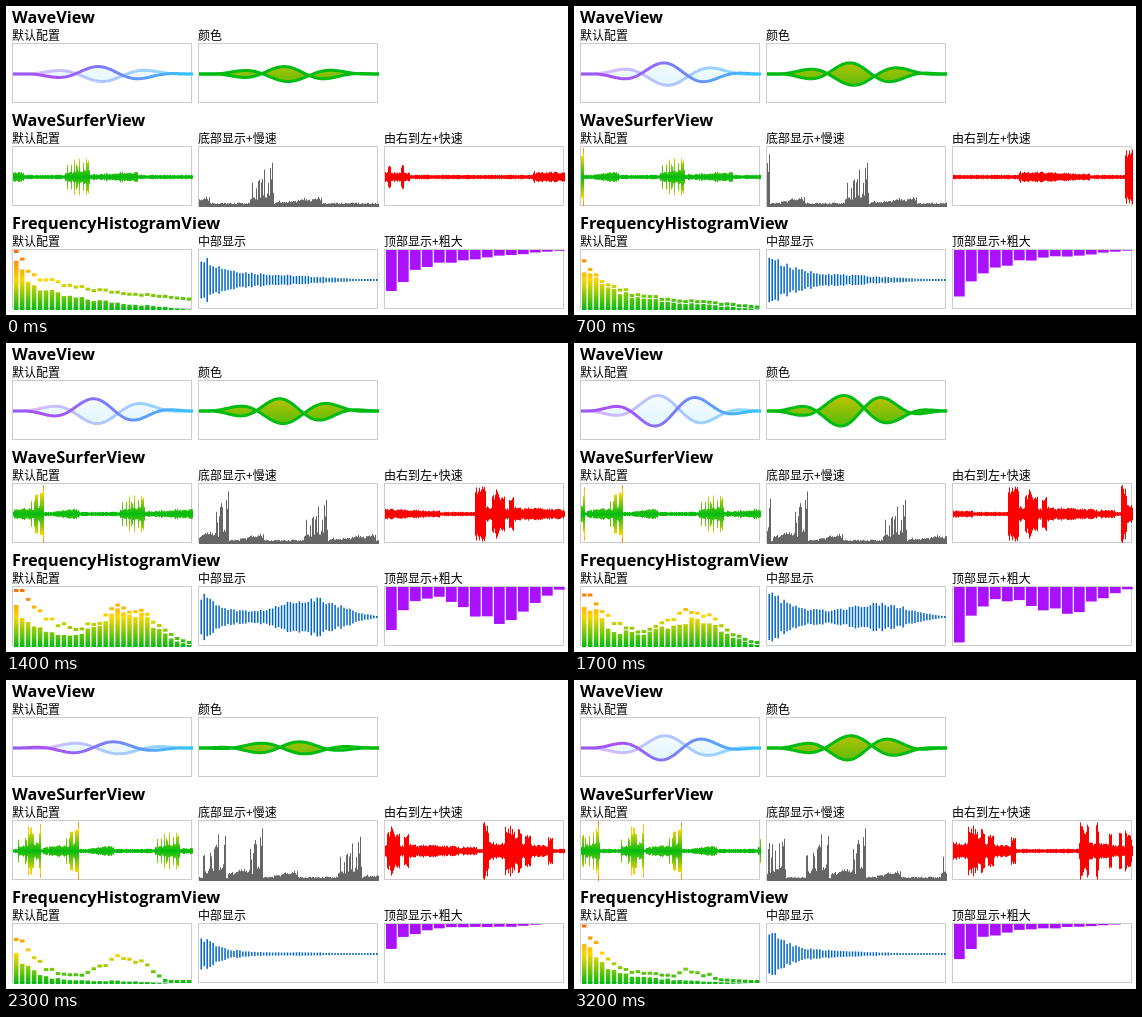
Write an HTML page with a canvas that moves like this. It is 562 by 309 pixels and loops after 3.3 s.

```html
<!DOCTYPE html>
<html lang="zh">
<head>
<meta charset="utf-8">
<style>
  html, body { margin: 0; width: 100%; height: 100%; overflow: hidden; background: #fff; }
  svg, canvas { position: absolute; left: 0; top: 0; width: 562px; height: 309px; }
  rect { fill: none; stroke: #ccc; }
  text { font: 12px "Noto Sans CJK SC", "Noto Sans CJK", "Noto Sans CJK JP", sans-serif; }
  .title { font: bold 16.3px "Open Sans", "Noto Sans", sans-serif; }
</style>
</head>
<body>
<svg viewBox="0 0 562 309">
  <g>
    <text class="title" x="6" y="17">WaveView</text>
    <text x="6" y="34">默认配置</text>
    <text x="192" y="34">颜色</text>
    <rect x="6.5" y="37.5" width="179" height="59"/>
    <rect x="192.5" y="37.5" width="179" height="59"/>
  </g>
  <g transform="translate(0 103)">
    <text class="title" x="6" y="17">WaveSurferView</text>
    <text x="6" y="34">默认配置</text>
    <text x="192" y="34">底部显示+慢速</text>
    <text x="378" y="34">由右到左+快速</text>
    <rect x="6.5" y="37.5" width="179" height="59"/>
    <rect x="192.5" y="37.5" width="179" height="59"/>
    <rect x="378.5" y="37.5" width="179" height="59"/>
  </g>
  <g transform="translate(0 206)">
    <text class="title" x="6" y="17">FrequencyHistogramView</text>
    <text x="6" y="34">默认配置</text>
    <text x="192" y="34">中部显示</text>
    <text x="378" y="34">顶部显示+粗大</text>
    <rect x="6.5" y="37.5" width="179" height="59"/>
    <rect x="192.5" y="37.5" width="179" height="59"/>
    <rect x="378.5" y="37.5" width="179" height="59"/>
  </g>
</svg>
<canvas id="stage" width="562" height="309"></canvas>
<script>
const ctx = document.getElementById('stage').getContext('2d');
const W = 180, H = 60, MID = H / 2;
const STEP = 100, STEPS = 33;

const rand = (a, b = 0) => {
  const v = Math.sin(a * 12.9898 + b * 78.233) * 43758.5453;
  return v - Math.floor(v);
};

// Pulse peaking at 1, with its own rise and fall widths
const bump = (n, at, rise, fall) => Math.exp(-(((n - at) / (n < at ? rise : fall)) ** 2));

function gradient(x1, y1, stops) {
  const g = ctx.createLinearGradient(0, 0, x1, y1);
  stops.forEach(([at, color]) => g.addColorStop(at, color));
  return g;
}

const GREEN = 'rgb(0,187,17)', YELLOW = 'rgb(255,215,0)', ORANGE = 'rgb(255,102,0)';

function panel(col, row, draw) {
  ctx.save();
  ctx.translate(7 + col * 186, 38 + row * 103);
  ctx.beginPath();
  ctx.rect(0, 0, W, H);
  ctx.clip();
  draw();
  ctx.restore();
}

// Overall volume at a step, 0..1
const power = n => .07 + .2 * bump(n, 1, 3, 4) + .56 * bump(n, 8, 1.2, 4)
  + .48 * bump(n, 17.5, 5, 5) + .6 * bump(n, 29, 1.2, 4);

// ---- Sine waves ----
const blueWave = {
  front: gradient(W, 0, [[0, 'rgb(150,96,238)'], [.2, 'rgb(170,79,249)'], [1, 'rgb(53,199,253)']]),
  back: gradient(W, 0, [[0, 'rgba(209,130,255,.6)'], [1, 'rgba(53,199,255,.6)']]),
  fill: gradient(0, H, [[0, 'rgba(255,255,255,.2)'], [1, 'rgba(54,197,252,.2)']])
};
const greenWave = {
  front: GREEN, back: GREEN,
  fill: gradient(0, H, [[0, 'rgb(250,195,0)'], [1, 'rgb(25,187,16)']])
};

function wavePath(freq, amp, phase) {
  const pts = [];
  for (let x = 0; x <= W; x++) {
    const u = x / W, env = Math.sin(Math.PI * u) ** 2;
    pts.push([x, MID + env * MID * amp * Math.sin(2 * Math.PI * u * freq + phase)]);
  }
  return pts;
}

function trace(pts) {
  ctx.beginPath();
  pts.forEach(p => ctx.lineTo(...p));
}

function drawWave(n, colors) {
  const amp = power(n), phase = 5.1 - .872 * n;
  const front = wavePath(2, amp, phase), back = wavePath(1.8, amp, phase + 3.45);
  trace(front.concat([...back].reverse()));
  ctx.fillStyle = colors.fill;
  ctx.fill();
  ctx.lineWidth = 3;
  for (const [pts, color] of [[back, colors.back], [front, colors.front]]) {
    trace(pts);
    ctx.strokeStyle = color;
    ctx.stroke();
  }
}

// ---- Scrolling loudness ----
// Syllables: start step, end step, body level, spike level
const syllables = [
  [-32, -20, .15, .2], [-19.5, -13.2, .25, .8], [-2.7, 3.4, .19, .2], [6.4, 9.7, .28, 1.05],
  [9.7, 15.5, .23, .23], [16, 22, .3, 1], [27.4, 33, .28, 1]
];

function loudness(k, speed) {
  const s = k / speed, grain = .7 + .4 * rand(k, speed);
  const hit = syllables.find(([from, to]) => s >= from && s < to);
  if (!hit) return .07 * grain;
  const [from, to, body, spike] = hit;
  const fade = 1 - .45 * (s - from) / (to - from);
  const cell = Math.floor(s / .28);
  const level = rand(cell, 5) > .6 ? spike * (.7 + .3 * rand(cell, 9)) : body;
  return Math.min(1, level * fade * grain);
}

const mirrored = gradient(0, H,
  [[0, ORANGE], [.15, YELLOW], [.5, GREEN], [.85, YELLOW], [1, ORANGE]]);

function drawSurfer(n, { speed, color, bottom, reverse }) {
  ctx.fillStyle = color;
  const head = Math.round(speed * n);
  for (let j = 0; j < W; j++) {
    const v = loudness(head - j, speed);
    const x = reverse ? W - 1 - j : j;
    const h = bottom ? Math.max(2, v * H * .95) : Math.max(2, v * H);
    ctx.fillRect(x, bottom ? H - h : MID - h / 2, 1, h);
  }
}

// ---- Spectrum: low tones, a sloping voice and a high hiss ----
function barHeight(n, i, count) {
  const b = Math.max(0, (i + .5) / count * 15 - .5);
  const low = 18 + 32 * power(n);
  const voice = 26 * power(n) + 12 * bump(n, 0, 1, 6) + 14 * bump(n, 10, 3, 2);
  const hiss = 34 * bump(n, 13, 1.5, 6);
  const h = low * Math.exp(-b / 1.4) + voice * Math.max(0, 1 - b / 16)
    + hiss * bump(b, 9, 3.3, 3.3) - 1.5;
  return Math.min(H, Math.max(0, h) * (.8 + .35 * rand(i + count, n)));
}

// Caps ride on the bars and sink slowly
function capHeight(n, i) {
  const sink = 1.5;
  let top = barHeight(0, i, 30) + 8 - sink * n;
  for (let k = 0; k <= n; k++) top = Math.max(top, barHeight(n - k, i, 30) - sink * k);
  return Math.min(H, Math.max(3, top + 4));
}

const rising = gradient(0, H, [[0, ORANGE], [.5, YELLOW], [1, GREEN]]);

function drawBottomBars(n) {
  ctx.fillStyle = rising;
  for (let i = 0; i < 30; i++) {
    const x = 1 + 5.96 * i, h = barHeight(n, i, 30);
    ctx.fillRect(x, H - h, 4.5, h);
    ctx.fillRect(x, H - capHeight(n, i), 4.5, 3);
  }
}

function drawMiddleBars(n) {
  ctx.fillStyle = '#06c';
  for (let i = 0; i < 60; i++) {
    const h = Math.max(2, barHeight(n, i, 60));
    ctx.fillRect(1.48 + 2.975 * i, MID - h / 2, 1.5, h);
  }
}

function drawTopBars(n) {
  ctx.fillStyle = '#a1f';
  for (let i = 0; i < 15; i++) ctx.fillRect(1 + 12 * i, 0, 10.7, barHeight(n, i, 15));
}

function render(n) {
  ctx.clearRect(0, 0, 562, 309);
  panel(0, 0, () => drawWave(n, blueWave));
  panel(1, 0, () => drawWave(n, greenWave));
  panel(0, 1, () => drawSurfer(n, { speed: 3.9, color: mirrored }));
  panel(1, 1, () => drawSurfer(n, { speed: 3.83, color: '#666', bottom: true }));
  panel(2, 1, () => drawSurfer(n, { speed: 11.7, color: '#f00', reverse: true }));
  panel(0, 2, () => drawBottomBars(n));
  panel(1, 2, () => drawMiddleBars(n));
  panel(2, 2, () => drawTopBars(n));
}

let shown = -1;
function tick() {
  const n = Math.floor(performance.now() / STEP) % STEPS;
  if (n !== shown) render(shown = n);
  requestAnimationFrame(tick);
}
tick();
</script>
</body>
</html>
```
